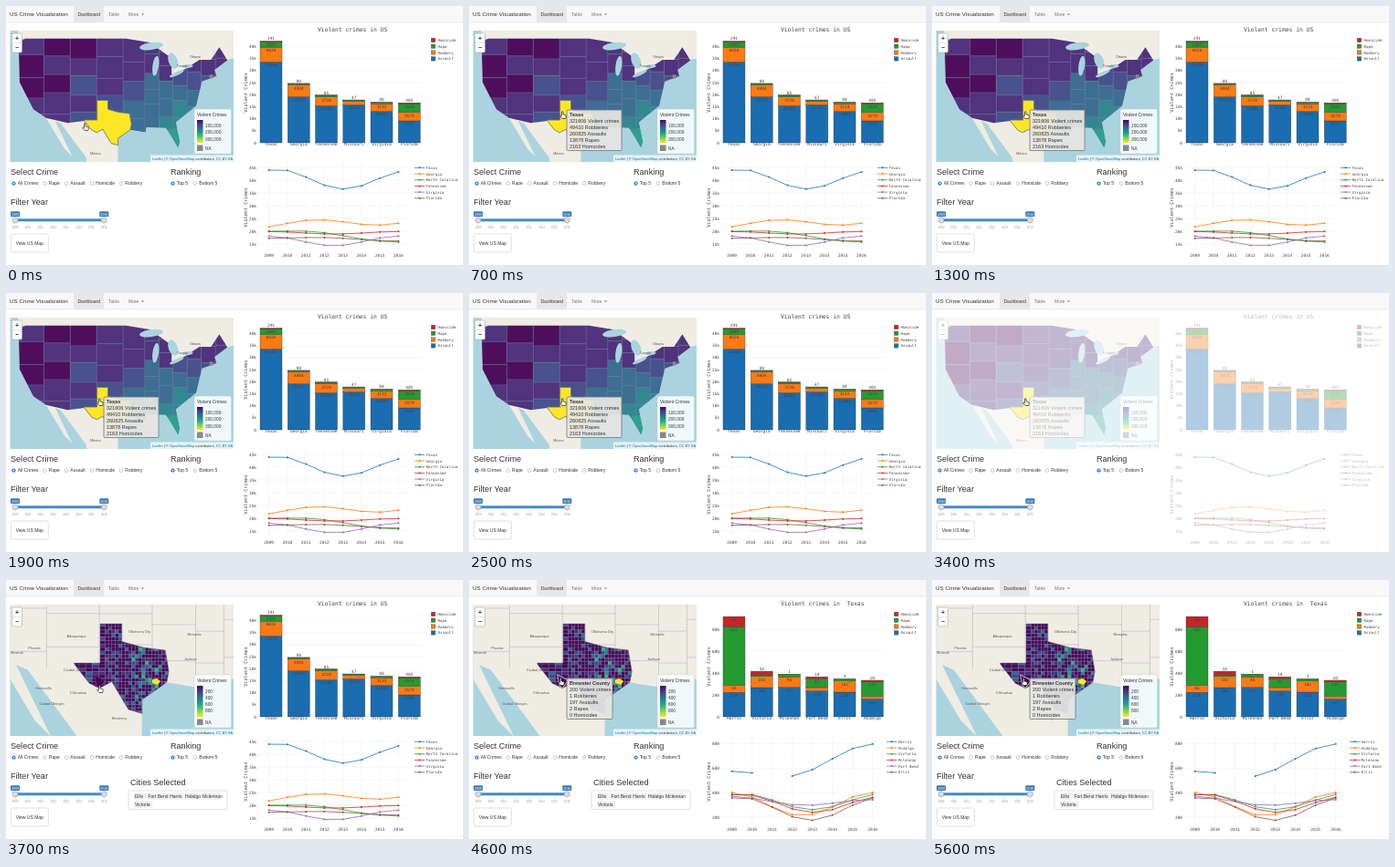
An HTML page for the animation above (5700 ms loop, 500 by 284 pixels).

```html
<!DOCTYPE html>
<html lang="en">
<head>
<meta charset="utf-8">
<title>US Crime Visualization</title>
<style>
html, body { margin: 0; width: 100%; height: 100%; overflow: hidden; background: #fff; }
svg { display: block; width: 500px; height: 284px; font-family: "Liberation Sans", Arial, sans-serif; fill: #333; }
.mono { font-family: "DejaVu Sans Mono", monospace; fill: #444; }
</style>
</head>
<body>
<svg id="stage" viewBox="0 0 500 284"></svg>
<script>
const LOOP = 5700;
const VIRIDIS = ['#440154', '#482878', '#3e4989', '#31688e', '#26828e', '#1f9e89', '#35b779', '#6ece58', '#b5de2b', '#fde725'];
const LINES = ['#1f77b4', '#ff7f0e', '#2ca02c', '#d62728', '#9467bd', '#8c564b'];
const STACK = ['#c3272b', '#259a30', '#fb7a14', '#1a6db0'];
const YEARS = Array.from({ length: 8 }, (_, i) => 2009 + i);

// svg helpers
const text = (x, y, s, size = 5, more = '') => `<text x="${x}" y="${y}" font-size="${size}" ${more}>${s}</text>`;
const rect = (x, y, w, h, fill, more = '') => `<rect x="${x}" y="${y}" width="${w}" height="${h}" fill="${fill}" ${more}/>`;
const circle = (x, y, r, fill, more = '') => `<circle cx="${x}" cy="${y}" r="${r}" fill="${fill}" ${more}/>`;
const path = (d, fill, more = '') => `<path d="${d}" fill="${fill}" ${more}/>`;
const line = (d, colour, width = .5, more = '') => path(d, 'none', `stroke="${colour}" stroke-width="${width}" ${more}`);
const group = (id, body, more = '') => `<g id="${id}" ${more}>${body}</g>`;
const MID = 'text-anchor="middle"', END = 'text-anchor="end"';

function random(seed) {
  return () => (seed = seed * 16807 % 2147483647) / 2147483647;
}

// Mercator projections of both map views, pinned at the panhandle corner
const merc = lat => Math.log(Math.tan(Math.PI / 4 + lat * Math.PI / 360)) * 180 / Math.PI;
const view = (k, x0, y0) => (lon, lat) => [x0 + (lon + 103) * k, y0 - (merc(lat) - 39.25) * k];
const usView = view(3.96, 99.6, 103.5), txView = view(7.92, 103, 48);

function shape(coords, proj) {
  const n = coords.trim().split(/\s+/).map(Number);
  let d = '';
  for (let i = 0; i < n.length; i += 2) d += (i ? 'L' : 'M') + proj(n[i], n[i + 1]).map(v => v.toFixed(1));
  return d + 'Z';
}
const box = (lon, lat, w, h, proj) => shape(`${lon} ${lat} ${lon + w} ${lat} ${lon + w} ${lat - h} ${lon} ${lat - h}`, proj);

// key points of the coasts and borders
const border = '-93.8 29.7 -97.2 27.6 -97.2 25.9 -99.1 26.4 -101.4 29.8 -103.1 29 -104.5 29.6 -106.5 31.8 ';
const usa = '-124.7 48.4 -122.8 49 -95 49 -88.4 48.3 -82.4 45.3 -82.4 42 -79 43 -74.7 45 -71.5 45 -69.2 47.4 -67 44.9 '
  + '-70.5 43 -70 41.7 -74 40.6 -75.6 35.3 -81.2 31.5 -80.1 26.8 -80.6 25.2 -82.8 28.5 -84 30.1 -89.4 30.3 -89.6 29.1 '
  + border + '-111.1 31.3 -117.1 32.5 -120.6 34.5 -124.4 40.4';
const texas = '-103 36.5 -100 36.5 -100 34.5 -97 33.8 -94 33.5 -93.5 31 ' + border + '-106.6 32 -103 32';
const canada = '-124 55 -125 49 -95 49 -83 42 -79 42.5 -74.7 45 -67 45 -60 46 -60 55';
const mexico = '-117.1 32.5 -112 25 -109.8 23 -114.6 31.8 -113 31.2 -106 22.8 -105.5 20 -97.3 20 ' + '-97.2 25.9 -101.4 29.8 -106.5 31.8';

// columns of states, narrower toward the east, darker in the north and west
function states() {
  const rnd = random(5), list = [];
  for (let lon = -125, w; lon < -67; lon += w) {
    w = lon < -103 ? 7.3 : lon < -90 ? 6 : 3.9;
    for (let lat = 49.2, h; lat > 25; lat -= h) {
      h = (lon < -90 ? 3.2 : 2.5) + 1.8 * rnd();
      const level = .5 + 1.4 * rnd() + 7 * (lon + 125) / 58 * (49.2 - lat) / 24;
      list.push({ at: [lon, lat, w, h], colour: VIRIDIS[Math.min(5, Math.floor(level))] });
    }
  }
  return list;
}
const STATES = states();

function baseMap(proj) {
  return rect(4, 27, 246, 145, '#aad3df') + [canada, mexico, usa].map(s => path(shape(s, proj), '#efece3')).join('');
}

const label = (x, y, t) => text(x, y, t, 3.7, MID + ' fill="#555"');

function usMap() {
  const fills = STATES.map(s => path(box(...s.at, usView), s.colour, 'stroke="#59628c" stroke-width=".4"')).join('');
  let s = baseMap(usView) + `<g clip-path="url(#usClip)" opacity=".94">${fills}</g>`;
  // the Great Lakes
  const lake = (lon, lat, rx, ry, turn) => `<ellipse rx="${rx}" ry="${ry}" fill="#aad3df" transform="translate(${usView(lon, lat)}) rotate(${turn})"/>`;
  s += lake(-88, 47.6, 13, 4, -8) + lake(-86.8, 43.8, 3.4, 11, 8) + lake(-82, 44.8, 5, 9, -20) + lake(-81, 42.2, 8.5, 2, -24) + lake(-78, 43.7, 6, 2, -5);
  s += path(box(-71.9, 42, .9, .8, usView), '#888') + path(shape(texas, usView), VIRIDIS[9], 'stroke="#777" stroke-width=".8"');
  return s + label(207, 57, 'Ottawa') + label(193, 67, 'Toronto') + label(98, 163, 'México');
}

function countyMap() {
  const rnd = random(11);
  const edges = STATES.map(s => line(box(...s.at, txView), '#b9a5bd', .4, 'stroke-dasharray="2 1"')).join('');
  let cells = '';
  for (let lat = 36.6; lat > 25.8; lat -= .4)
    for (let lon = -106.8, w; lon < -93; lon += w) {
      w = lon < -102.8 ? .9 : .46;
      const level = Math.floor(rnd() ** 3 * (lon > -99 ? 7 : 4));
      cells += path(box(lon, lat, w, .4, txView), VIRIDIS[level], 'stroke="#777a9c" stroke-width=".3"');
    }
  return baseMap(txView) + `<g clip-path="url(#landClip)">${edges}</g><g clip-path="url(#txClip)">${cells}</g>`
    + line(shape(texas, txView), '#667')
    + path('M160 109L165 108L169 111L166 115L160 113Z', VIRIDIS[9])
    + path(shape('-103.8 30.6 -102.6 30.1 -102.4 29.8 -103.1 29 -103.5 29.3', txView), VIRIDIS[0], 'id="brewster" stroke="#aaa"')
    + label(77, 63, 'Albuquerque') + label(31, 76, 'Phoenix') + label(12, 81, 'Mexicali') + label(75, 100, 'Ciudad Juárez')
    + label(41, 120, 'Hermosillo') + label(79, 125, 'Chihuahua') + label(50, 137, 'Ciudad Obregón') + label(124, 153, 'Monterrey')
    + label(146, 58, 'Oklahoma City') + label(206, 61, 'Memphis') + label(202, 88, 'Jackson');
}

function mapLegend(top, gap, ticks) {
  return rect(206, top, 40.5, 162 - top, '#fff', 'rx="1.8" fill-opacity=".84" stroke="#bbb" stroke-width=".3"')
    + text(209, top + 8, 'Violent Crimes', 5)
    + rect(209, top + 12, 6.5, 138 - top, 'url(#ramp)')
    + ticks.map((t, i) => text(218, top + 20 + i * gap, t, 4.8)).join('')
    + rect(209, 152.5, 6.5, 6.5, '#888') + text(218, 158, 'NA', 4.8);
}

const controls = rect(6.5, 30, 11, 21, '#fff', 'rx="1.5" stroke="#aaa" stroke-width=".6"') + line('M7 40.5H17', '#ccc')
  + text(12, 38, '+', 7, MID + ' font-weight="bold"') + text(12, 48, '−', 7, MID + ' font-weight="bold"')
  + rect(158, 163.5, 91, 7.5, '#fff', 'fill-opacity=".72"')
  + text(248, 168.8, '<tspan fill="#0078a8">Leaflet</tspan> | © <tspan fill="#0078a8">OpenStreetMap</tspan> contributors, <tspan fill="#0078a8">CC-BY-SA</tspan>', 3.9, END);

const tip = (id, w, rows) => group(id, rect(0, 0, w, 44.5, '#e6e6e2', 'rx="1" fill-opacity=".93" stroke="#777" stroke-width=".8"')
  + rows.map((l, i) => text(3, 6.5 + i * 7.1, l, 5.5, i ? '' : 'font-weight="bold"')).join(''));

// title and value grid shared by both kinds of chart
function axis(middle, right, scale, top, step, unit) {
  let s = text(0, 0, 'Violent Crimes', 5.2, `${MID} transform="translate(263.5 ${middle}) rotate(-90)"`);
  for (let v = top[0]; v <= top[1]; v += step)
    s += line(`M276 ${scale(v)}H${right}`, '#eee') + text(274, scale(v) + 1.6, v + (v ? unit : ''), 4.45, END);
  return s;
}

// stacked bars; each row holds homicides, rapes, robberies and assaults
function bars(title, px, max, step, unit, rows) {
  const scale = v => 150 - v * px, per = unit ? 1000 : 1;
  let s = text(341, 28.2, title, 6.33, 'xml:space="preserve"') + axis(95, 456, scale, [0, max], step, unit);
  Object.entries(rows).forEach(([name, counts], i) => {
    const cx = 290 + i * 30.25;
    let y = 150;
    for (let j = 3; j >= 0; j--) {
      const h = counts[j] / per * px, inside = h > 5;
      y -= h;
      s += rect(cx - 12, y, 24, h, STACK[j], 'stroke="#333" stroke-width=".35"');
      if (inside || !j) s += text(cx, inside ? y + 5 : y - 1, counts[j], 4.45, MID);
    }
    s += text(cx, 153.4, name, 4.45, MID);
  });
  ['Homicide', 'Rape', 'Robbery', 'Assault'].forEach((l, i) =>
    s += rect(465.2, 35.2 + i * 6.8, 4.5, 4.5, STACK[i], 'stroke="#333" stroke-width=".3"') + text(472.5, 39 + i * 6.8, l, 4.1));
  return s;
}

// seven-year waves; each row holds base, yearly trend, swing, peak and maybe a missing year
function waves(dx, legendX, scale, range, step, unit, rows) {
  const x = i => 287.7 + i * dx;
  let s = axis(221, x(7) + 10, scale, range, step, unit);
  YEARS.forEach((year, i) => s += line(`M${x(i)} 172V267`, '#eee') + text(x(i), 275, year, 4.45, MID));
  Object.entries(rows).forEach(([name, [base, trend, swing, peak, gap]], k) => {
    const colour = LINES[k], ly = 177.3 + k * 6.7;
    let d = '', dots = '';
    YEARS.forEach((_, i) => {
      if (i === gap) return;
      const y = scale(base + trend * i + swing * Math.cos((i - peak) * 2 * Math.PI / 7)).toFixed(1);
      d += (i === 0 || i - 1 === gap ? 'M' : 'L') + x(i) + ' ' + y;
      dots += circle(x(i), y, 1, colour);
    });
    s += line(d, colour, .8) + dots + line(`M${legendX} ${ly}h11`, colour, .8) + circle(legendX + 5.5, ly, 1, colour)
      + text(legendX + 12.6, ly + 1.5, name, 4.1);
  });
  return s;
}

const usCharts = bars('Violent crimes in US', 2.64, 40, 5, 'k', {
  Texas: [291, 2387, 6026, 33559], Georgia: [99, 530, 4904, 19129], Tennessee: [85, 570, 3728, 15385],
  Missouri: [47, 480, 1516, 15752], Virginia: [88, 610, 3133, 13085], Florida: [405, 3524, 3579, 9102]
}) + waves(20.25, 447, v => 303 - 2.8 * v, [15, 45], 5, 'k', {
  Texas: [40.6, -.1, 3.7, .5], Georgia: [22.6, .2, 1.4, 2.5], 'North Carolina': [20.5, -.6, .8, 2.5],
  Tennessee: [19.4, 0, .5, 0], Virginia: [16.2, 0, 1.9, 0], Florida: [17.6, -.15, .4, 3]
});
const txCharts = bars('Violent crimes in  Texas', .1195, 800, 200, '', {
  Harris: [93, 537, 66, 224], Victoria: [34, 14, 102, 268], Mclennan: [1, 24, 96, 271],
  'Fort Bend': [18, 81, 30, 238], Ellis: [3, 18, 102, 226], Hidalgo: [10, 137, 25, 163]
}) + waves(22, 457, v => 286.7 - .134 * v, [200, 800], 200, '', {
  Harris: [508, 32, 70, -.4, 2], Hidalgo: [305, 0, 95, 0], Victoria: [325, 0, 65, .5],
  Mclennan: [320, -3, 70, .5], 'Fort Bend': [340, -4, 30, 0], Ellis: [268, 0, 95, .4]
});

function page() {
  let s = rect(0, 0, 500, 18, '#f8f8f8') + rect(0, 17.7, 500, .6, '#dedede') + rect(74, 0, 33, 18, '#e7e7e7');
  s += text(4, 11.2, 'US Crime Visualization', 6.25) + text(78.5, 11, 'Dashboard') + text(112, 11, 'Table', 5, 'fill="#777"')
    + text(134, 11, 'More', 5, 'fill="#777"') + path('M148 8.6h3l-1.5 1.6z', '#777');
  const head = (x, y, t) => text(x, y, t, 9.1);
  s += head(5, 184.6, 'Select Crime') + head(180, 184.6, 'Ranking') + head(5, 218.4, 'Filter Year');
  const radio = (x, t, on) => circle(x, 194.6, 1.9, on ? '#2a7de1' : '#fff', `stroke="${on ? '#2a7de1' : '#999'}" stroke-width=".5"`)
    + (on ? circle(x, 194.6, .8, '#fff') : '') + text(x + 4.3, 196.4, t);
  s += radio(8.5, 'All Crimes', 1) + radio(42.5, 'Rape') + radio(66, 'Assault') + radio(94, 'Homicide') + radio(126, 'Robbery')
    + radio(182.5, 'Top 5', 1) + radio(207, 'Bottom 5');
  s += rect(8, 233.3, 100, 3, '#428bca', 'rx="1"');
  YEARS.forEach((year, i) => {
    const x = 10 + i * 13.9;
    s += line(`M${x} 238.5v2`, '#bbb', .4) + text(x, 244.3, year, 3, MID + ' fill="#999"');
    if (i % 7 === 0) s += rect(x - 5, 225.3, 10, 5.6, '#337ab7', 'rx="1"') + text(x, 229.6, year, 3.7, MID + ' style="fill:#fff"')
      + circle(x, 234.8, 3.1, '#dcdcdc', 'stroke="#999" stroke-width=".6"');
  });
  return s + rect(5.3, 250, 41, 20, '#fff', 'rx="1.6" stroke="#ccc" stroke-width=".6"') + text(25.8, 262, 'View US Map', 5, MID);
}

// chips wrap onto a second row
function chosen() {
  let s = text(136, 225.3, 'Cities Selected', 9.1) + rect(134, 231, 108, 20.5, '#fff', 'rx="1.5" stroke="#ccc" stroke-width=".6"');
  let x = 141, y = 239;
  for (const name of ['Ellis', 'Fort Bend', 'Harris', 'Hidalgo', 'Mclennan', 'Victoria']) {
    const w = name.length * 2.3 + 2;
    if (x + w > 240) { x = 141; y += 9; }
    s += rect(x - 1, y - 5.8, w, 7.6, '#efefef', 'rx=".8"') + text(x, y, name);
    x += w + 1;
  }
  return s;
}

const hand = path('M-1.5 -3Q-.7 -4 0 -3V0L3 .8Q3.7 1.5 2.7 4.5H-1L-3.4 1.5Q-3.2 .4 -1.5 1.6Z', '#fff', 'stroke="#222" stroke-width=".7"');

const clip = (id, body) => `<clipPath id="${id}">${body}</clipPath>`;
const stage = document.getElementById('stage');
stage.innerHTML = '<defs>' + clip('usClip', path(shape(usa, usView))) + clip('landClip', path(shape(usa, txView)))
  + clip('txClip', path(shape(texas, txView))) + clip('mapClip', rect(4.5, 27, 244.5, 144))
  + `<linearGradient id="ramp" x2="0" y2="1">${VIRIDIS.map((c, i) => `<stop offset="${i / 9}" stop-color="${c}"/>`).join('')}</linearGradient></defs>`
  + rect(0, 0, 500, 284, '#fff') + page() + group('chosen', chosen())
  + group('map', group('us', usMap() + mapLegend(113, 7.4, ['100,000', '200,000', '300,000']))
    + group('tx', countyMap() + mapLegend(104, 7, ['200', '400', '600', '800'])) + controls
    + tip('usTip', 60, ['Texas', '321606 Violent crimes', '49410 Robberies', '260825 Assaults', '13878 Rapes', '2163 Homicides'])
    + tip('txTip', 50, ['Brewster County', '200 Violent crimes', '1 Robberies', '197 Assaults', '2 Rapes', '0 Homicides']), 'clip-path="url(#mapClip)"')
  + group('charts', group('usCharts', usCharts) + group('txCharts', txCharts), 'class="mono"')
  + group('cursor', hand);

const $ = id => document.getElementById(id);
const show = (id, on) => $(id).setAttribute('display', on ? 'inline' : 'none');
const part = (t, a, b) => Math.min(1, Math.max(0, (t - a) / (b - a)));

function draw(now) {
  const t = Math.floor(now % LOOP / 100) * 100;
  const county = t >= 3700, local = t >= 4100, picked = t >= 4400;
  const hover = part(t, 100, 700), shift = part(t, 3700, 4400);
  const x = 87 + 16 * hover - 2 * shift, y = 132 - 13 * hover - 8 * shift;
  show('us', !county);
  show('tx', county);
  show('chosen', county);
  show('usCharts', !local);
  show('txCharts', local);
  show('usTip', t >= 600 && !county);
  show('txTip', picked);
  $('brewster').setAttribute('stroke-width', picked ? 1.1 : .3);
  for (const id of ['usTip', 'txTip']) $(id).setAttribute('transform', `translate(${x + 4 + 2 * shift} ${y - 5 + 2 * shift})`);
  $('cursor').setAttribute('transform', `translate(${x} ${y})`);
  // outputs dim while they are recalculated
  const fade = 1 - .65 * part(t, 2900, 3200);
  $('map').setAttribute('opacity', county ? 1 : fade);
  $('charts').setAttribute('opacity', local ? 1 : county ? 1 - .65 * part(t, 3800, 4000) : fade);
  requestAnimationFrame(draw);
}
requestAnimationFrame(draw);
</script>
</body>
</html>
```
